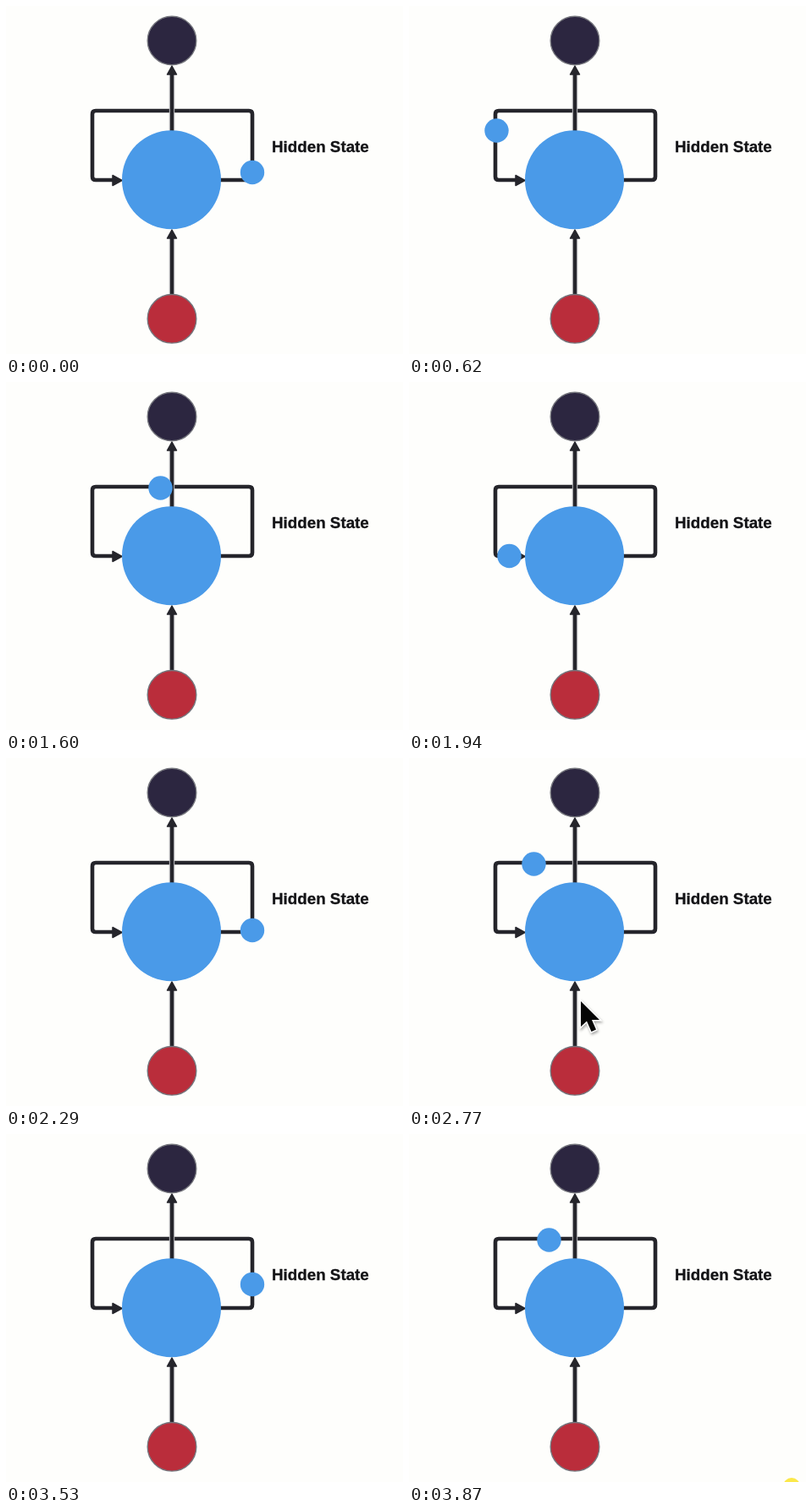
These frames come from a looping animation (469x412 px, 3.94 s). An HTML page:

```html
<!DOCTYPE html>
<html lang="en">
<head>
<meta charset="utf-8">
<title>Hidden State</title>
<style>
  html, body { margin: 0; width: 100%; height: 100%; overflow: hidden; background: #fefefc; }
  svg { display: block; width: 469px; height: 412px; }
  .scene { filter: blur(.7px); }
  .line { fill: none; stroke: #25252b; stroke-width: 4.6; stroke-linejoin: round; }
  .halo { fill: none; stroke: #a8a8ac; stroke-width: 6.4; }
  .stem { stroke-width: 4; }
  .head { fill: #25252b; stroke: #25252b; stroke-width: 1.5; stroke-linejoin: round; }
  .blue { fill: #4a9ae8; }
  .node { stroke: #74757c; stroke-width: 1.4; }
  text { font: bold 18.8px "Liberation Sans", Arial, sans-serif; fill: #141417; stroke: #141417; stroke-width: .3; }
  #cursor { fill: #050505; stroke: #fff; stroke-width: 3; paint-order: stroke; filter: drop-shadow(1px 2px 1.5px #0005); }
</style>
</head>
<body>
<svg viewBox="0 0 469 412">
  <g class="scene">
    <path class="line" d="M196 206H287Q291 206 291 202V128Q291 124 287 124H106Q102 124 102 128V202Q102 206 106 206H128"/>
    <path class="halo" d="M196 150V80M196 342V274"/>
    <path class="line stem" d="M196 150V78M196 342V272"/>
    <path class="head" d="M137 206.500L126 200.500V212.500ZM196 71L190.500 81H201.500ZM196 265L190.500 275H201.500Z"/>
    <circle class="blue" cx="195.500" cy="205.700" r="58.500"/>
    <circle class="node" cx="196" cy="41" r="28.800" fill="#2c2640"/>
    <circle class="node" cx="196" cy="370.300" r="28.800" fill="#ba2d3b"/>
    <text x="314" y="173">Hidden State</text>
    <circle id="ball" class="blue" r="14.200"/>
  </g>
  <path id="cursor" d="M0 0V30L7 23.500L12.500 36L18 33.500L13 22H22Z"/>
  <circle id="spot" cx="452" cy="417" r="10" fill="#fbe84a"/>
</svg>
<script>
  const LOOP = 3940, STEPS = 57;

  // Route of the ball: out of the big circle, around the loop and back in.
  const route = [[196, 206], [291, 206], [291, 125.5], [103.5, 125.5], [103.5, 206], [196, 206]];
  const lengths = route.slice(1).map(([x, y], i) => Math.hypot(x - route[i][0], y - route[i][1]));
  const total = lengths.reduce((a, b) => a + b);

  // [step, distance travelled]
  const travel = [[0, 104], [9, 385], [23, 820], [33, 1169], [40, 1391], [51, 1731], [56, 1909]];
  // [step, x, y]
  const pointer = [[39, 203, 288], [47, 203, 288], [50, 420, 296]];

  const $ = id => document.getElementById(id);
  const ball = $('ball'), cursor = $('cursor'), spot = $('spot');
  const place = (el, [x, y]) => el.setAttribute('transform', `translate(${x} ${y})`);
  const show = (el, on) => el.setAttribute('visibility', on ? 'visible' : 'hidden');
  const mix = (a, b, k) => a.map((v, i) => v + (b[i] - v) * k);

  function sample(keys, step) {
    let i = 0;
    while (i < keys.length - 2 && step >= keys[i + 1][0]) i++;
    const [a, ...from] = keys[i], [b, ...to] = keys[i + 1];
    return mix(from, to, Math.min(1, Math.max(0, (step - a) / (b - a))));
  }

  function along(distance) {
    let d = distance % total, i = 0;
    while (i < lengths.length - 1 && d > lengths[i]) d -= lengths[i++];
    return mix(route[i], route[i + 1], d / lengths[i]);
  }

  function draw(time) {
    const step = Math.min(STEPS - 1, Math.floor((time % LOOP + 5) * STEPS / LOOP));
    place(ball, along(sample(travel, step)[0]));
    place(cursor, sample(pointer, step));
    show(cursor, step >= 39 && step <= 50);
    show(spot, step === STEPS - 1);
  }

  const start = performance.now();
  function tick() {
    draw(performance.now() - start);
    requestAnimationFrame(tick);
  }
  tick();
</script>
</body>
</html>
```
